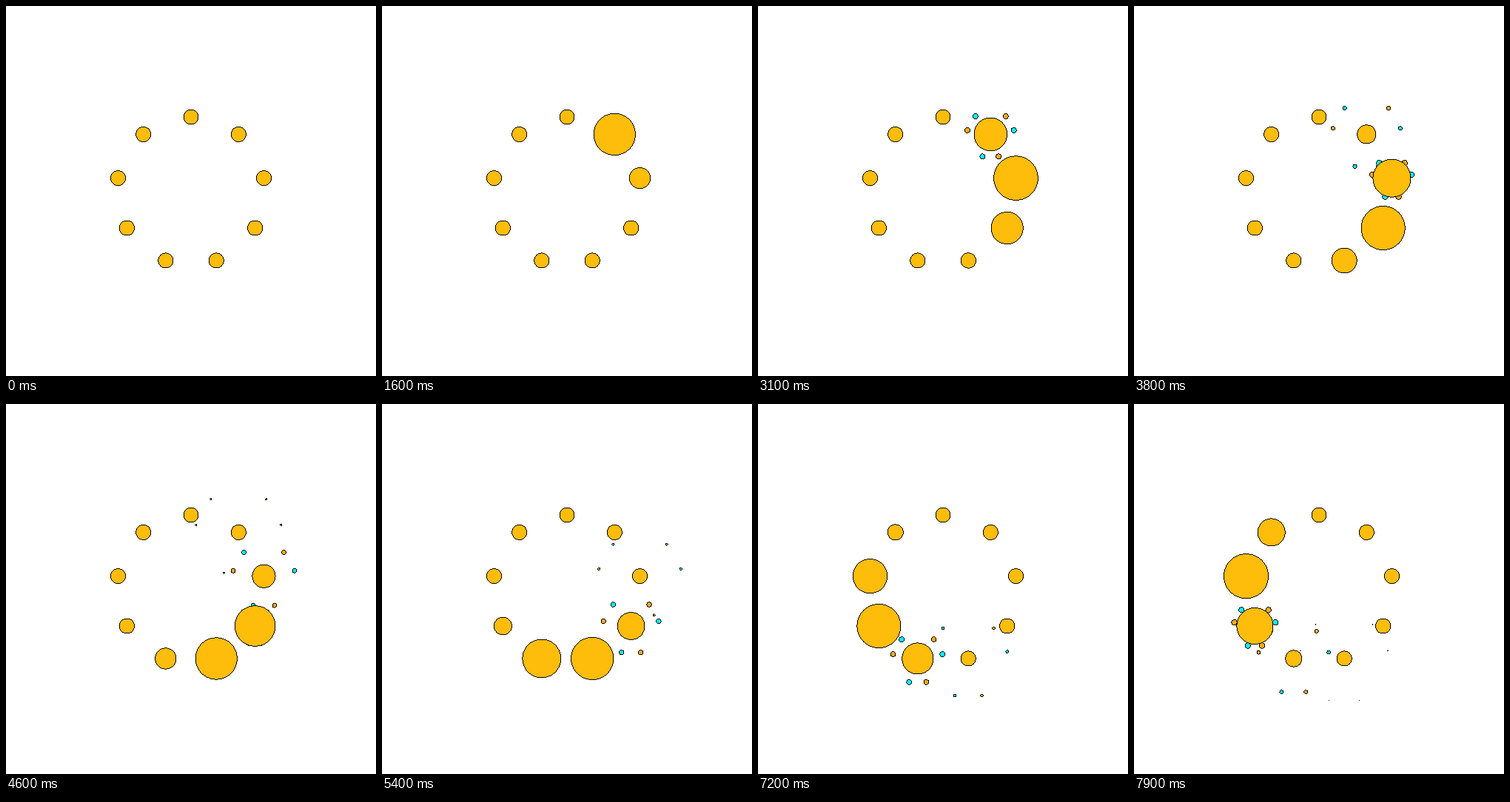
Recreate the animation shown at these times as an HTML page with a canvas. Size 500 by 500 pixels, loop 8 s.

```html
<!DOCTYPE html>
<html lang="en">
<head>
<meta charset="utf-8">
<title>Ring of dots</title>
<style>
  html, body { margin: 0; width: 100%; height: 100%; overflow: hidden; background: #fff; }
  canvas { display: block; width: 500px; height: 500px; }
</style>
</head>
<body>
<canvas id="stage" width="500" height="500"></canvas>
<script>
const SIZE = 500, LOOP = 8000, STEP = 100;
const COUNT = 9, RING = 100, STAGGER = 1000;
const WHITE = [255, 255, 255], BLACK = [0, 0, 0];
const GOLD = [254, 188, 11], AMBER = [245, 170, 30], CYAN = [0, 255, 255];

const ctx = document.getElementById('stage').getContext('2d');
const image = ctx.createImageData(SIZE, SIZE);
const pixels = new Uint32Array(image.data.buffer);
const pack = ([r, g, b]) => (255 << 24 | b << 16 | g << 8 | r) >>> 0;

const sineInOut = x => (1 - Math.cos(Math.PI * x)) / 2;
const sineIn = x => 1 - Math.cos(Math.PI * x / 2);

// Point at slot k of a nine-part ring, clockwise from the top.
function onRing(cx, cy, radius, k) {
  const a = 2 * Math.PI * k / COUNT;
  return [cx + radius * Math.sin(a), cy - radius * Math.cos(a)];
}

// Hard-edged disc; the outline is every inner pixel that touches the outside.
function disc([cx, cy], r, color) {
  const fill = pack(color), line = pack(BLACK), reach = r + 0.5;
  const inside = (dx, dy) => Math.hypot(dx, dy) < reach;
  for (let y = Math.floor(cy - reach); y <= cy + reach; y++) {
    for (let x = Math.floor(cx - reach); x <= cx + reach; x++) {
      const dx = Math.abs(x + 0.5 - cx), dy = Math.abs(y + 0.5 - cy);
      if (!inside(dx, dy)) continue;
      const inner = inside(dx + 1, dy) && inside(dx, dy + 1);
      pixels[y * SIZE + x] = inner ? fill : line;
    }
  }
}

function dotRadius(s) {
  if (s <= 0 || s >= 3970) return 10;
  if (s < 1900) return 10 + 20 * sineInOut(s / 2000);
  return 30 - 20 * sineIn((s - 1900) / 2070);
}

function burst([cx, cy], s) {
  const p = (s - 2000) / 3000;
  if (p < 0 || p >= 1) return;
  const reach = 20 + 40 * sineInOut(p);
  const r = 4 * (1 - p * p);
  for (let k = 1; k < COUNT; k++) {
    if (k % 3) disc(onRing(cx, cy, reach, k), r, k % 3 === 1 ? AMBER : CYAN);
  }
}

function draw(t) {
  pixels.fill(pack(WHITE));
  const dots = [];
  for (let k = 1; k <= COUNT; k++) {
    dots.push({ at: onRing(250, 250, RING, k), s: t - (k - 1) * STAGGER });
  }
  for (const { at, s } of dots) burst(at, s);
  for (const { at, s } of dots) disc(at, dotRadius(s), GOLD);
  ctx.putImageData(image, 0, 0);
}

const start = performance.now();
function tick() {
  const t = Math.max(0, performance.now() - start) % LOOP;
  draw(Math.floor(t / STEP) * STEP);
  requestAnimationFrame(tick);
}
tick();
</script>
</body>
</html>
```
